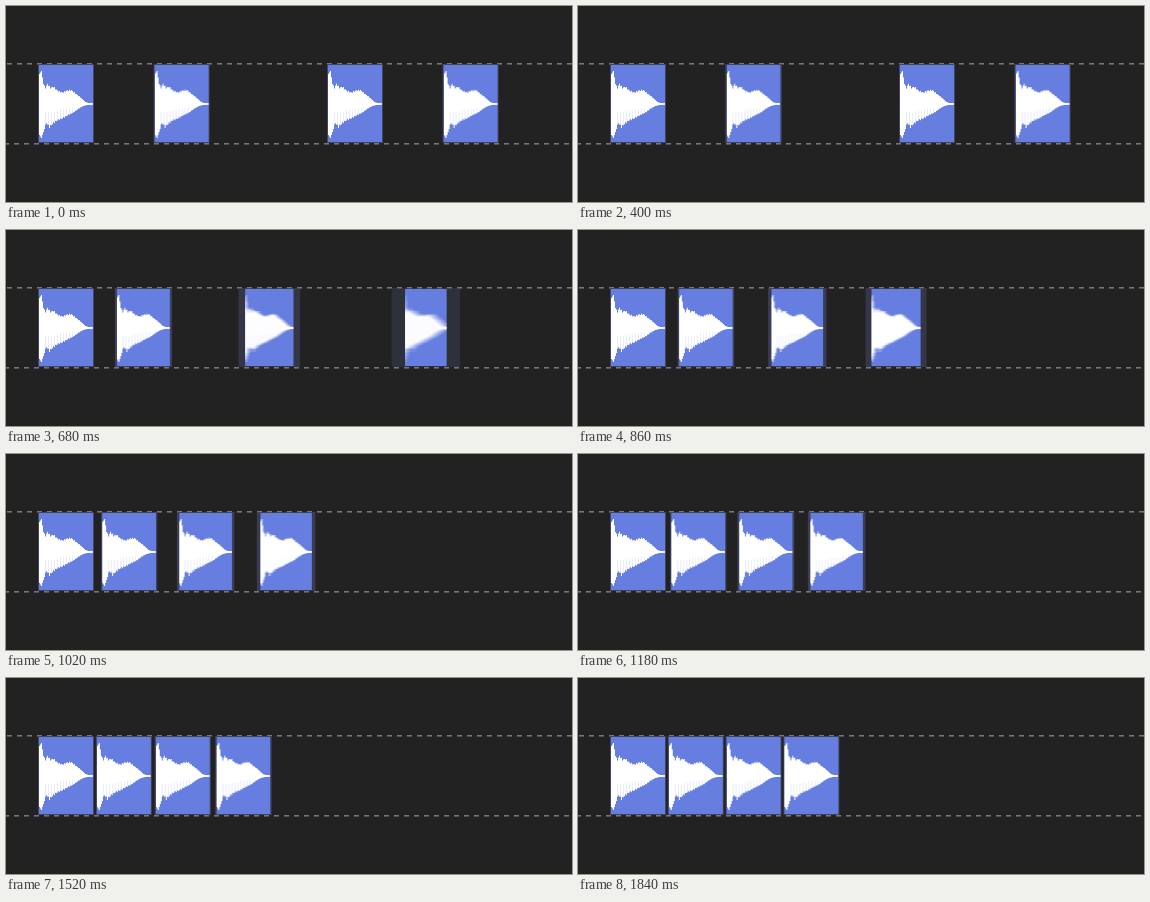
Write an HTML page with a canvas that moves like this. It is 566 px wide and 196 px high and loops after 2.2 s.

```html
<!DOCTYPE html>
<html lang="en">
<head>
<meta charset="utf-8">
<title>Clips closing up</title>
<style>
  html, body { margin: 0; height: 100%; overflow: hidden; background: #222; }
  canvas { display: block; }
</style>
</head>
<body>
<canvas id="stage" width="566" height="196"></canvas>
<script>
const ctx = document.getElementById('stage').getContext('2d');
const LOOP = 2200, START = 400, STAGGER = 100, DURATION = 1200, SHUTTER = 15;
const LEFT = 32, STEP = 57.8, WIDTH = 56, TOP = 58, HEIGHT = 79, MIDDLE = 98;
const SLOTS = [0, 2, 5, 7];

// Envelopes as [x, half height]
const UPPER = [[0, 30], [2, 33], [4, 20], [6, 17], [8, 21], [11, 17], [14, 18], [18, 14],
  [23, 12], [27, 14], [32, 14.5], [36, 11], [41, 7], [46, 2], [49, 1], [54, .8]];
const LOWER = [[0, 31], [2, 34], [5, 25], [7, 20], [10, 24], [14, 20], [18, 17], [23, 15],
  [28, 12], [34, 9], [39, 5], [44, 2], [48, 1], [54, .8]];

const mix = (a, b, k) => a + (b - a) * k;

function sample(points, x) {
  const i = Math.max(1, points.findIndex(p => p[0] >= x));
  const [x0, y0] = points[i - 1], [x1, y1] = points[i];
  return mix(y0, y1, (x - x0) / (x1 - x0));
}

// cubic-bezier(.14, .2, .02, 1)
function ease(p) {
  if (p <= 0) return 0;
  if (p >= 1) return 1;
  const bezier = (s, a, b) => 3 * (1 - s) ** 2 * s * a + 3 * (1 - s) * s * s * b + s ** 3;
  let lo = 0, hi = 1;
  for (let i = 0; i < 24; i++) {
    const s = (lo + hi) / 2;
    if (bezier(s, .14, .02) < p) lo = s; else hi = s;
  }
  return bezier(lo, .2, 1);
}

function clipX(i, t) {
  const p = (t - START - STAGGER * (i - 1)) / DURATION;
  return LEFT + STEP * mix(SLOTS[i], i, ease(p));
}

function makeWave() {
  const canvas = document.createElement('canvas');
  canvas.width = 54;
  canvas.height = HEIGHT;
  const g = canvas.getContext('2d');
  const mid = MIDDLE - TOP;
  for (let x = 0; x < 54; x++) {
    const ripple = x > 4 && x < 44 ? .95 + .05 * Math.cos(x * Math.PI * .8) : 1;
    const up = sample(UPPER, x) * ripple, down = sample(LOWER, x) * ripple;
    g.fillStyle = '#fff';
    g.fillRect(x, mid - up, 1, up + down);
    // Faint gaps between the oscillations
    if (x > 4 && x < 36 && x % 3 === 0) {
      g.fillStyle = 'rgba(102, 126, 224, .15)';
      g.fillRect(x, mid + down * .4, 1, down * .6);
    }
  }
  return canvas;
}

const wave = makeWave();
const blur = document.createElement('canvas');
blur.width = 566;
blur.height = HEIGHT;
const blurCtx = blur.getContext('2d');

function drawLine(y, offset) {
  ctx.strokeStyle = '#80808a';
  ctx.lineWidth = 1.4;
  ctx.setLineDash([5, 5]);
  ctx.lineDashOffset = offset;
  ctx.beginPath();
  ctx.moveTo(0, y);
  ctx.lineTo(566, y);
  ctx.stroke();
}

function drawClip(i, t) {
  const from = clipX(i, t - SHUTTER / 2), to = clipX(i, t + SHUTTER / 2);
  const x = clipX(i, t), smear = from - to;
  const fillX = x + 1 + smear / 2, fillW = WIDTH - 2 - smear;

  ctx.globalAlpha = 1 / (1 + smear / 8);
  ctx.fillStyle = '#41455f';
  ctx.fillRect(x - smear / 2, TOP, WIDTH + smear, HEIGHT);
  ctx.globalAlpha = 1;
  ctx.fillStyle = '#667ee0';
  ctx.fillRect(fillX, TOP + 1, fillW, HEIGHT - 2);

  // Average the wave over the open shutter
  const count = Math.max(1, Math.ceil(smear * 2));
  blurCtx.clearRect(0, 0, 566, HEIGHT);
  blurCtx.globalCompositeOperation = 'lighter';
  blurCtx.globalAlpha = 1 / count;
  for (let k = 0; k < count; k++) {
    blurCtx.drawImage(wave, mix(from, to, (k + .5) / count) + 1, 0);
  }
  ctx.save();
  ctx.beginPath();
  ctx.rect(fillX, TOP, fillW, HEIGHT);
  ctx.clip();
  ctx.drawImage(blur, 0, TOP);
  ctx.restore();
}

function draw(now) {
  const t = Math.floor(now % LOOP / 20) * 20;
  ctx.fillStyle = '#222';
  ctx.fillRect(0, 0, 566, 196);
  drawLine(57.8, -1);
  drawLine(137.8, 2);
  SLOTS.forEach((_, i) => drawClip(i, t));
  requestAnimationFrame(draw);
}
requestAnimationFrame(draw);
</script>
</body>
</html>
```
